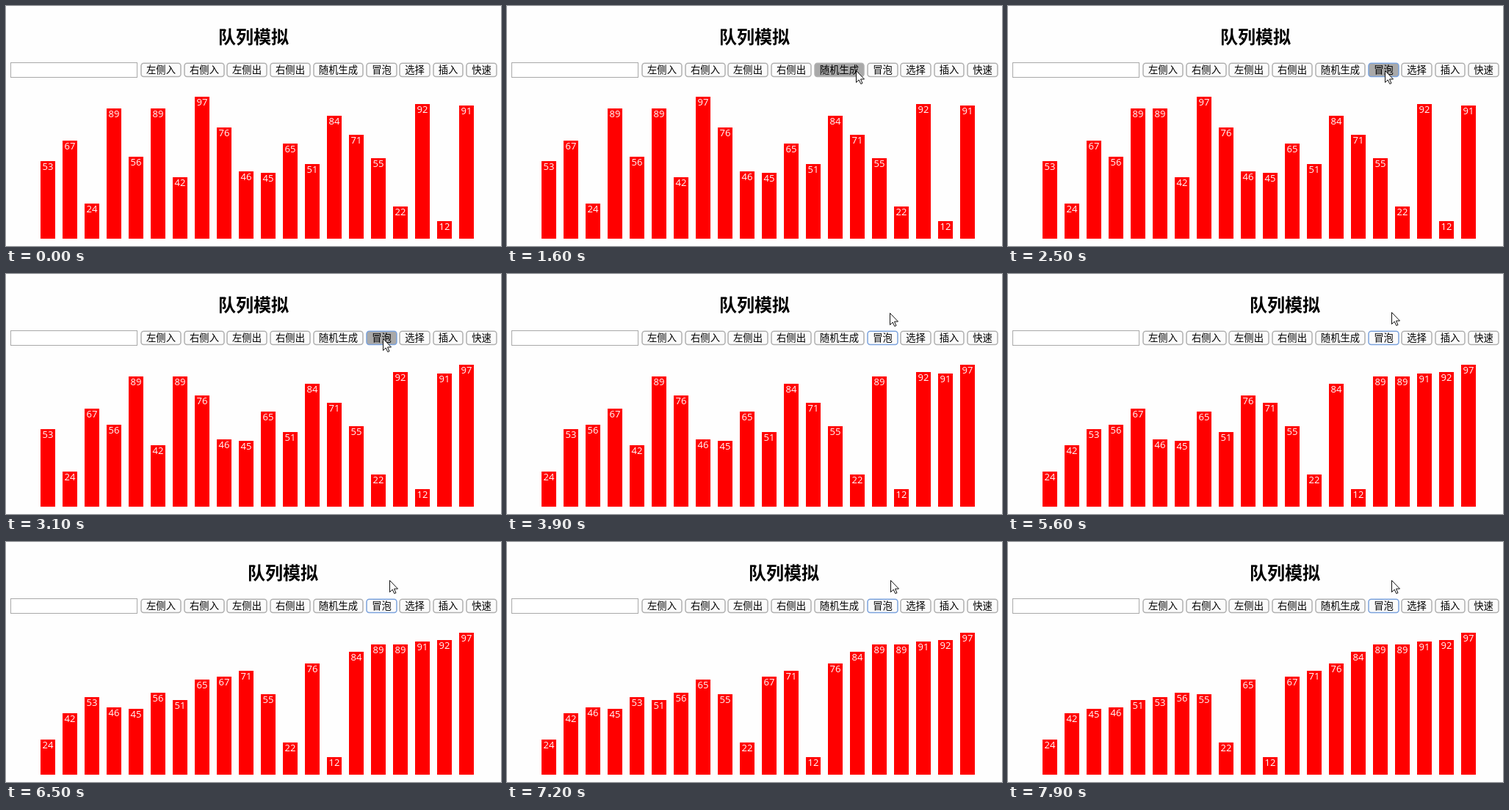
Write an HTML page that moves like this. It is 674 px wide and 328 px high and loops after 8 s.

```html
<!DOCTYPE html>
<html lang="zh-CN">
<head>
<meta charset="utf-8">
<title>队列模拟</title>
<style>
  html, body { margin: 0; width: 100%; height: 100%; overflow: hidden; background: #fefefe; }
  svg { display: block; }
  text { text-anchor: middle; font-family: "Noto Sans CJK SC", "Noto Sans CJK", sans-serif; }
  #title { font-size: 24px; font-weight: bold; }
  .label { font-size: 13.33px; }
  .btn { fill: #fbfbfb; stroke: #b0b0b0; stroke-width: 1.5; }
  .btn.focus { stroke: #7ba2dc; }
  .btn.hover { fill: #a9a9a9; }
  .bar rect { fill: #f00; }
  .bar text { fill: #fff; font: 13px "Open Sans", "Noto Sans", sans-serif; }
</style>
</head>
<body>
<svg id="stage" width="674" height="328" viewBox="0 0 674 328">
  <text id="title" x="337" y="51">队列模拟</text>
  <rect x="6.5" y="77.5" width="172" height="20" fill="#fff" stroke="#a9a9a9"/>
  <g id="buttons"></g>
  <g id="bars"></g>
  <path id="cursor" d="M.5 .5V16.5L4.2 13L6.8 18.5L9 17.5L6.5 12H11.5Z" fill="#fff" stroke="#111"/>
</svg>
<script>
const LOOP = 8000, SORT_START = 2230, COMPARE_MS = 45.6, FOCUS_AT = 2150;
const values = [53, 67, 24, 89, 56, 89, 42, 97, 76, 46, 45, 65, 51, 84, 71, 55, 22, 92, 12, 91];
const buttonSpecs = [
  ['左侧入', 184, 238], ['右侧入', 243, 297], ['左侧出', 301, 355],
  ['右侧出', 360, 414], ['随机生成', 419, 486], ['冒泡', 491, 532],
  ['选择', 536, 577], ['插入', 582, 622], ['快速', 627, 668]
];
// time, x, y of the pointer tip
const pointerPath = [
  [420, 690, 36], [1300, 454, 88], [1400, 455, 88], [1500, 455, 88],
  [1600, 475, 88], [1800, 513, 88], [3200, 513, 88], [3700, 521, 53],
  [4150, 521, 53], [4200, 522, 52]
];

const byId = id => document.getElementById(id);

function add(parent, tag, attrs, text = '') {
  const el = document.createElementNS('http://www.w3.org/2000/svg', tag);
  for (const key in attrs) el.setAttribute(key, attrs[key]);
  el.textContent = text;
  return parent.appendChild(el);
}

const buttons = buttonSpecs.map(([name, left, right]) => {
  const el = add(byId('buttons'), 'rect',
    { class: 'btn', x: left, y: 78.2, width: right - left, height: 18.4, rx: 3.5 });
  add(byId('buttons'), 'text', { class: 'label', x: (left + right) / 2, y: 92 }, name);
  return { el, name, left, right };
});

const bars = values.map((_, i) => {
  const group = add(byId('bars'), 'g', { class: 'bar' });
  return {
    rect: add(group, 'rect', { x: 47 + 30 * i, width: 20 }),
    text: add(group, 'text', { x: 57 + 30 * i })
  };
});

const clamp = v => Math.min(1, Math.max(0, v));
const smooth = v => v * v * (3 - 2 * v);

// Bubble sort after the given number of comparisons
function bubble(steps) {
  const a = values.slice();
  for (let end = a.length - 1; end > 0; end--) {
    for (let i = 0; i < end; i++) {
      if (steps-- <= 0) return a;
      if (a[i] > a[i + 1]) [a[i], a[i + 1]] = [a[i + 1], a[i]];
    }
  }
  return a;
}

function pointerAt(t) {
  const next = pointerPath.findIndex(p => p[0] > t);
  if (next < 0) return pointerPath[pointerPath.length - 1].slice(1);
  if (next === 0) return pointerPath[0].slice(1);
  const [t0, x0, y0] = pointerPath[next - 1], [t1, x1, y1] = pointerPath[next];
  const k = smooth((t - t0) / (t1 - t0));
  return [Math.round(x0 + (x1 - x0) * k), Math.round(y0 + (y1 - y0) * k)];
}

function draw(t) {
  bubble(Math.floor((t - SORT_START) / COMPARE_MS)).forEach((v, i) => {
    const top = 318 - 2 * v;
    bars[i].rect.setAttribute('y', top);
    bars[i].rect.setAttribute('height', 2 * v);
    bars[i].text.setAttribute('y', top + 12);
    bars[i].text.textContent = v;
  });

  const [x, y] = pointerAt(t);
  byId('cursor').setAttribute('transform', `translate(${x} ${y})`);
  for (const { el, name, left, right } of buttons) {
    el.classList.toggle('hover', x >= left && x <= right && y >= 78 && y <= 97);
    el.classList.toggle('focus', name === '冒泡' && t >= FOCUS_AT);
  }
  byId('title').setAttribute('x', 337 + 40 * smooth(clamp((t - 4050) / 150)));
}

function tick() {
  draw(performance.now() % LOOP);
  requestAnimationFrame(tick);
}
tick();
</script>
</body>
</html>
```
